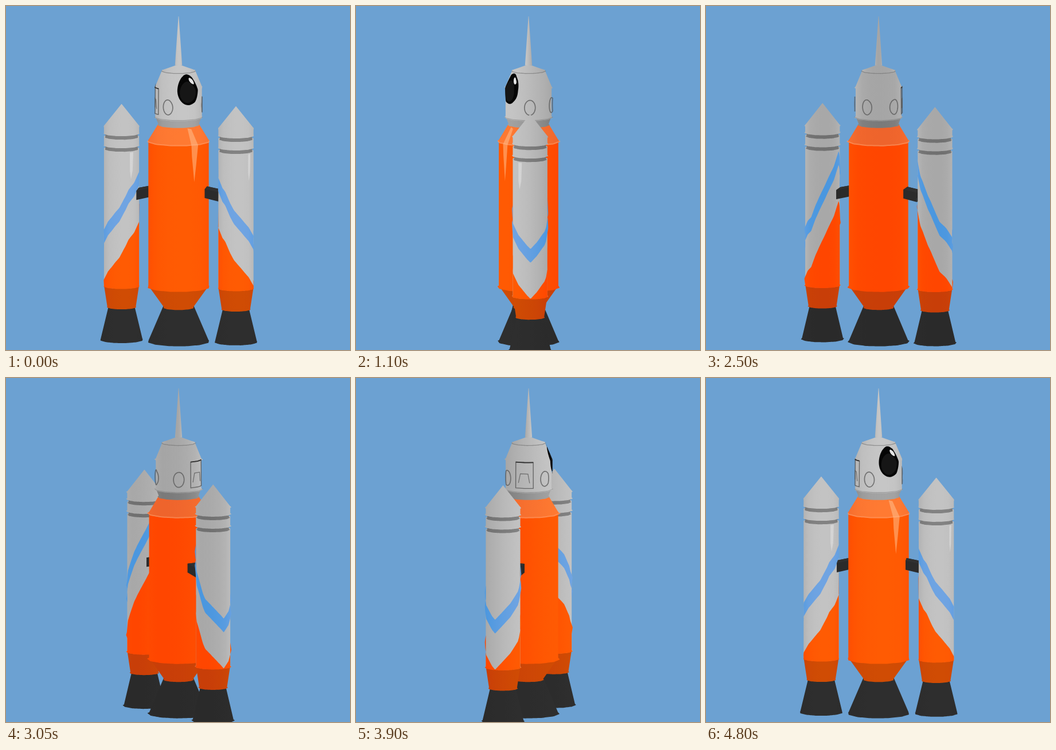
These frames come from a looping animation (600 px wide and 600 px high, 4850 ms). An HTML page with a canvas:

```html
<!DOCTYPE html>
<html>
<head>
<meta charset="utf-8">
<style>
html, body { margin: 0; width: 100%; height: 100%; overflow: hidden; background: #6ca1d2; }
canvas { display: block; }
</style>
</head>
<body>
<canvas id="stage" width="600" height="600"></canvas>
<script>
const ctx = document.getElementById('stage').getContext('2d');
const LOOP = 4850, STEP = 50, TILT = 0.16, ORBIT = 100.5;
const RAD = Math.PI / 180, SIDES = 30, INNER = Math.cos(15 * RAD);
const cos = a => Math.cos(a * RAD), sin = a => Math.sin(a * RAD);
const mod = (v, n) => ((v % n) + n) % n;
const clamp = (v, lo, hi) => Math.max(lo, Math.min(hi, v));
let spin = 0;

// Angles: 0 = screen right, 90 = towards the viewer, 180 = screen left.
// Every solid is a twelve-sided prism turning around its own axis.
function point(part, r, a, y) {
  const facet = r * INNER / cos(mod(a - spin + 13, SIDES) - 15);
  return [part.x + facet * cos(a), part.y + y + TILT * facet * sin(a)];
}

function range(from, to, step) {
  const list = [];
  for (let a = from; a <= to; a += step) list.push(a);
  return list;
}
const FRONT = range(-15, 195, 3), BACK = range(195, 345, 3), HALF = range(0, 180, 3);

function trace(points, close = true) {
  ctx.beginPath();
  points.forEach(p => ctx.lineTo(p[0], p[1]));
  if (close) ctx.closePath();
}
function fill(points, style) {
  trace(points);
  ctx.fillStyle = style;
  ctx.fill();
}
function stroke(points, style, width, close) {
  trace(points, close);
  ctx.strokeStyle = style;
  ctx.lineWidth = width;
  ctx.stroke();
}

// Paint = [colour on the lit side, colour on the shaded side]
const GREY = [[195, 195, 195], [168, 168, 168]];
const HEAD = [[198, 198, 198], [165, 165, 165]];
const UNDER = [[164, 164, 164], [122, 122, 122]];
const GROOVE = [[130, 130, 130], [112, 112, 112]];
const ORANGE = [[255, 91, 3], [255, 70, 0]];
const SHOULDER = [[255, 122, 50], [238, 100, 44]];
const BURNT = [[208, 76, 4], [200, 62, 8]];
const BLUE = [[112, 164, 226], [74, 151, 223]];
const DARK = [[46, 46, 46], [42, 42, 42]];

function lit(part, r, [light, shade]) {
  const grad = ctx.createLinearGradient(part.x + r, 0, part.x - r, 0);
  for (let i = 0; i <= 6; i++) {
    const a = Math.acos(1 - i / 3) / RAD;
    const k = 0.5 + 0.5 * cos(a - spin - 80);
    const rgb = light.map((v, c) => Math.round(shade[c] + (v - shade[c]) * k));
    grad.addColorStop(i / 6, `rgb(${rgb})`);
  }
  return grad;
}

function band(part, r0, y0, r1, y1, paint) {
  fill([
    ...FRONT.map(a => point(part, r1, a, y1)),
    ...BACK.map(a => point(part, r0, a, y0))
  ], lit(part, Math.max(r0, r1), paint));
}

function ribbon(part, r, top, bottom, paint) {
  fill([
    ...FRONT.map(a => point(part, r, a, top(a))),
    ...FRONT.map(a => point(part, r, a, bottom(a))).reverse()
  ], lit(part, r, paint));
}

function seam(part, r, y, style, width) {
  stroke(HALF.map(a => point(part, r, a, y)), style, width, false);
}

// Wraps an outline of [angle offset, height] around a solid; empty when it faces away.
function decal(part, radiusAt, angle, outline) {
  const turn = mod(angle + spin + 90, 360) - 180;
  const reach = Math.max(...outline.map(p => Math.abs(p[0])));
  if (Math.abs(turn) > 90 + reach) return [];
  return outline.map(([da, y]) =>
    point(part, radiusAt(y), 90 + clamp(turn + da, -90, 90), y));
}
const oval = (da, y, ry, lean = 0) => range(0, 355, 5).map(a =>
  [da * cos(a) + lean * sin(a), y + ry * sin(a)]);

const headRadius = y => y < 142 ? 30 + 12.5 * (y - 113) / 29 : 42.5;
const coreRadius = y => y < 236 ? 37 + 18 * (y - 207) / 29 : 55;

function drawHead(part) {
  const wrap = (angle, outline) => decal(part, headRadius, angle, outline);
  band(part, 42.5, 194, 37, 207, UNDER);
  band(part, 42.5, 142, 42.5, 194, HEAD);
  band(part, 30, 113, 42.5, 142, HEAD);
  band(part, 6, 104, 30, 113, HEAD);
  seam(part, 30, 113, 'rgba(110,110,110,.6)', 1.3);
  seam(part, 42.5, 193, 'rgba(110,110,110,.5)', 1);
  band(part, 0.3, 18, 6.5, 103, HEAD);

  for (const angle of [5, 117, 223, 294])
    stroke(wrap(angle, oval(13, 171, 13)), 'rgba(85,85,85,.75)', 1.7);

  const across = range(-22, 22, 11);
  const lintel = across.map(a => [a, 141]), sill = across.map(a => [-a, 186]);
  stroke(wrap(171, [...lintel, ...sill]), 'rgba(80,80,80,.8)', 1.4);
  stroke(wrap(171, lintel), '#333', 1.8, false);
  stroke(wrap(171, [[15, 177], [10, 161], [-9, 161], [-13, 177]]), 'rgba(90,90,90,.8)', 1.2, false);

  fill(wrap(64, oval(29, 141, 26)), '#050505');
  fill(wrap(66, oval(21, 145, 18)), '#161616');
  fill(wrap(51, oval(6, 126.5, 5.5, -4)), '#e4e4e4');
}

function drawCore(part) {
  band(part, 28, 525, 54.5, 585, DARK);
  band(part, 55, 490, 27, 526, BURNT);
  band(part, 55, 236, 55, 490, ORANGE);
  band(part, 37, 207, 55, 236, SHOULDER);
  seam(part, 55, 235, 'rgba(255,160,110,.5)', 2);
  const streak = [[-4, 210], [7, 208], [7, 236], [6, 255], [1, 300], [-3, 270], [-7, 236]];
  fill(decal(part, coreRadius, 58, streak), 'rgba(255,190,140,.55)');
  drawHead(part);
}

// Lower edge of the grey paint around a booster, measured from its outer side.
const EDGE = [[0, 490], [45, 464], [60, 455], [90, 436], [120, 405], [173, 375], [194, 341],
  [240, 387], [270, 421], [297, 455], [315, 464], [360, 490]];
function paintEdge(angle) {
  const a = mod(angle, 360);
  const i = EDGE.findIndex(p => p[0] > a);
  const [a0, y0] = EDGE[i - 1], [a1, y1] = EDGE[i];
  return y0 + (y1 - y0) * (a - a0) / (a1 - a0);
}

function drawBooster(b) {
  const edge = a => paintEdge(b.side * (a - b.angle));
  band(b, 23.5, 526, 38, 584, DARK);
  band(b, 32, 490, 26, 527, BURNT);
  band(b, 32, 251, 32, 490, GREY);
  ribbon(b, 32, edge, () => 490.5, ORANGE);
  ribbon(b, 32, a => edge(a) - 87, a => edge(a) - 63, BLUE);
  const shine = [[-6, 253], [6, 253], [6, 285], [2, 300], [-4, 285]];
  fill(decal(b, () => 32, b.shine, shine), 'rgba(225,225,225,.6)');
  band(b, 29.5, 243, 29.5, 251.5, GROOVE);
  band(b, 32, 230, 32, 245, GREY);
  band(b, 29.5, 222, 29.5, 230.5, GROOVE);
  band(b, 32, 212, 32, 224, GREY);
  band(b, 0.3, 173, 32, 212, GREY);
}

function drawStrut(b) {
  const c = cos(b.angle), s = sin(b.angle);
  const corner = (r, w, y) => [301 + r * c + w * s, y + TILT * (r * s - w * c)];
  const plan = [[48, -16], [48, 16], [72, 16], [72, -16]];
  const top = plan.map(([r, w]) => corner(r, w, r < 60 ? 316 : 321));
  const low = plan.map(([r, w]) => corner(r, w, r < 60 ? 331.5 : 337));
  for (let i = 0; i < 4; i++) {
    const j = (i + 1) % 4;
    fill([top[i], top[j], low[j], low[i]], '#2b2b2b');
  }
  fill(top, '#303030');
}

function booster(angle, side, shine) {
  return { x: 301.3 + ORBIT * cos(angle), y: TILT * ORBIT * sin(angle), angle, side, shine };
}

function draw() {
  const time = Math.floor(performance.now() % LOOP / STEP) * STEP;
  spin = 360 * time / LOOP;
  ctx.fillStyle = '#6ca1d2';
  ctx.fillRect(0, 0, 600, 600);
  const pair = [booster(spin + 7, 1, 42), booster(spin + 187, -1, 56)];
  const [back, front] = pair.sort((p, q) => p.y - q.y);
  drawBooster(back);
  drawStrut(back);
  drawCore({ x: 301, y: 0 });
  drawStrut(front);
  drawBooster(front);
  requestAnimationFrame(draw);
}
draw();
</script>
</body>
</html>
```
